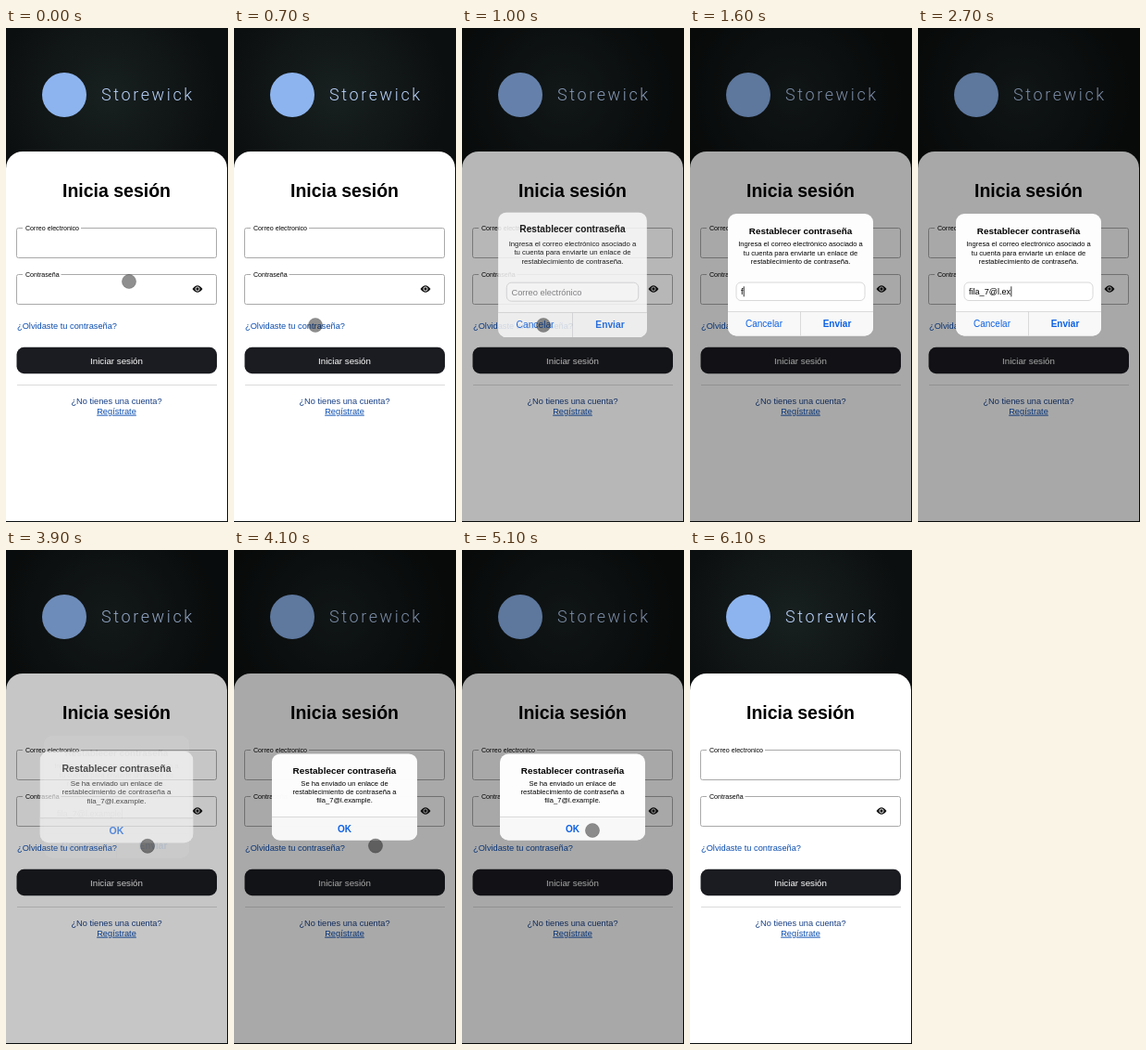
An HTML page that plays this animation: 240x532 px, repeating every 6200 ms.

```html
<!DOCTYPE html>
<html lang="es">
<head>
<meta charset="utf-8">
<title>Inicia sesión</title>
<style>
  html, body { margin: 0; width: 100%; height: 100%; overflow: hidden; background: #0c0f0f; }
  svg { display: block; width: 100%; height: 100%; }
  text { font-family: "Liberation Sans", Arial, sans-serif; fill: #000; white-space: pre; }
  .mid { text-anchor: middle; }
  .bold { font-weight: 700; }
  .brand { font: 300 18px Roboto, "Open Sans", sans-serif; fill: #b9d3fb; }
  .h1 { font-size: 19.5px; }
  .label { font-size: 7.1px; }
  .link { font-size: 9.25px; fill: #0b4db0; }
  .field { fill: #fff; stroke: #a0a0a0; stroke-width: .9; }
  .head { font-size: 9.9px; }
  .body { font-size: 7.6px; }
  .entry { font-size: 9.1px; }
  .action { font-size: 10px; fill: #0c60e4; }
  .rule { stroke: #d2d2d4; stroke-width: .8; }
</style>
</head>
<body>
<svg viewBox="0 0 240 532" preserveAspectRatio="none">
  <defs>
    <radialGradient id="glow" gradientUnits="userSpaceOnUse" cx="110" cy="72" r="120">
      <stop offset="0" stop-color="#182020"/>
      <stop offset="1" stop-color="#0c0f0f"/>
    </radialGradient>
    <clipPath id="askClip"><rect x="41" y="200" width="157" height="131.5" rx="9"/></clipPath>
    <clipPath id="sentClip"><rect x="41" y="219.5" width="157" height="93" rx="9"/></clipPath>
  </defs>

  <rect width="240" height="532" fill="url(#glow)"/>
  <circle cx="63" cy="72" r="24" fill="#8db4ee"/>
  <text class="brand" x="103" y="78" letter-spacing="2.6">Storewick</text>

  <path d="M0 531V151a18 18 0 0 1 18-18H221a18 18 0 0 1 18 18V531z" fill="#fff"/>
  <text class="mid bold h1" x="119.5" y="181.5">Inicia sesión</text>

  <rect class="field" x="11.5" y="215.5" width="216" height="32" rx="2"/>
  <rect x="18" y="214" width="63" height="3" fill="#fff"/>
  <text class="label" x="21" y="218">Correo electronico</text>

  <rect class="field" x="11.5" y="265.5" width="216" height="32" rx="2"/>
  <rect x="18" y="264" width="41.5" height="3" fill="#fff"/>
  <text class="label" x="21" y="268">Contraseña</text>
  <path d="M201.5 281Q207 273.4 212.5 281Q207 288.6 201.5 281z" fill="#111"/>
  <circle cx="207" cy="281" r="2.1" fill="#111" stroke="#fff" stroke-width=".9"/>

  <text class="link" x="12" y="324.3">¿Olvidaste tu contraseña?</text>
  <rect x="11.5" y="343.8" width="216.5" height="28.4" rx="8" fill="#1b1c21"/>
  <text class="mid" x="119.5" y="361.5" font-size="9.75" style="fill:#fff">Iniciar sesión</text>
  <path class="rule" d="M12 384.5H228"/>
  <text class="mid link" x="119.5" y="405" style="fill:#173f86">¿No tienes una cuenta?</text>
  <text class="mid link" x="119.5" y="415.7" text-decoration="underline">Regístrate</text>

  <rect id="dim" width="240" height="532"/>

  <g id="ask">
    <g clip-path="url(#askClip)">
      <rect x="41" y="200" width="157" height="132" fill="#fdfdfd"/>
      <rect x="41" y="305.5" width="157" height="27" fill="#f8f8f8"/>
      <path class="rule" d="M41 305.5H198M119.5 305.5V332"/>
    </g>
    <text class="mid bold head" x="119.5" y="221.5">Restablecer contraseña</text>
    <g class="mid body">
      <text x="119.5" y="235.4">Ingresa el correo electrónico asociado a</text>
      <text x="119.5" y="244.7">tu cuenta para enviarte un enlace de</text>
      <text x="119.5" y="254">restablecimiento de contraseña.</text>
    </g>
    <rect x="50" y="274" width="139" height="19.5" rx="5" fill="#fff" stroke="#cfcfd1" stroke-width=".8"/>
    <text id="entry" class="entry" x="55" y="287"></text>
    <rect id="caret" y="278.3" width="1" height="11" fill="#333"/>
    <text class="mid action" x="80" y="322">Cancelar</text>
    <text class="mid bold action" x="159" y="322">Enviar</text>
  </g>

  <g id="sent">
    <g clip-path="url(#sentClip)">
      <rect x="41" y="219" width="157" height="94" fill="#fdfdfd"/>
      <rect x="41" y="287.5" width="157" height="26" fill="#f8f8f8"/>
      <path class="rule" d="M41 287.5H198"/>
    </g>
    <text class="mid bold head" x="119.5" y="240.7">Restablecer contraseña</text>
    <g class="mid body">
      <text x="119.5" y="254.2">Se ha enviado un enlace de</text>
      <text x="119.5" y="263.4">restablecimiento de contraseña a</text>
      <text id="sentTo" x="119.5" y="272.4"></text>
    </g>
    <text class="mid bold action" x="119.5" y="303.7">OK</text>
  </g>

  <g id="pointer">
    <circle id="dot" r="7.6" fill="#000" fill-opacity=".44" stroke="#000" stroke-opacity=".25" stroke-width=".8"/>
    <path id="arrow" d="M0-1v12.4l2.9-2.7 2.3 5.2 2.1-.9-2.3-5.1h4z" fill="#000" stroke="#fff" stroke-width=".9"/>
  </g>
</svg>
<script>
const LOOP = 6200;
const EMAIL = 'fila_7@l.example';
const PLACEHOLDER = 'Correo electrónico';
const TYPE_START = 1550, TYPE_STEP = 105;

const $ = id => document.getElementById(id);
const [dim, ask, sent, entry, caret, pointer, dot, arrow] =
  ['dim', 'ask', 'sent', 'entry', 'caret', 'pointer', 'dot', 'arrow'].map($);
$('sentTo').textContent = EMAIL + '.';

const clamp = v => Math.min(1, Math.max(0, v));
const progress = (t, from, to) => clamp((t - from) / (to - from));
const easeOut = p => 1 - (1 - p) ** 3;
const easeInOut = p => p * p * (3 - 2 * p);

// time, x, y
const PATH = [
  [0, 133, 273], [150, 133, 273], [600, 88, 320], [3250, 88, 320],
  [3600, 153, 319], [4750, 153, 318], [5100, 141, 302], [5250, 124, 300]
];

function pointerAt(t) {
  const i = PATH.findIndex(k => k[0] > t);
  if (i < 0) return PATH[PATH.length - 1].slice(1);
  const [a, b] = [PATH[i - 1], PATH[i]];
  const p = easeInOut(progress(t, a[0], b[0]));
  return [a[1] + (b[1] - a[1]) * p, a[2] + (b[2] - a[2]) * p];
}

// Pops in slightly enlarged, then fades out in place.
function showAlert(el, t, open, close, cy) {
  const shown = easeOut(progress(t, open, open + 400));
  const alpha = shown * (1 - easeInOut(progress(t, close, close + 220)));
  const scale = 1 + 0.15 * (1 - shown);
  el.setAttribute('opacity', alpha);
  el.setAttribute('transform', `translate(119.5 ${cy}) scale(${scale}) translate(-119.5 ${-cy})`);
  return alpha;
}

function showEntry(t) {
  const count = Math.max(0, Math.min(EMAIL.length, Math.floor((t - TYPE_START) / TYPE_STEP) + 1));
  const text = count ? EMAIL.slice(0, count) : PLACEHOLDER;
  if (entry.textContent !== text) entry.textContent = text;
  entry.style.fill = count ? '#000' : '#77777b';
  caret.setAttribute('x', 55.2 + (count ? entry.getComputedTextLength() : 0));
  caret.setAttribute('opacity', t > 1200 ? 1 : 0);
}

function showPointer(t) {
  const hidden = (t > 1500 && t < 3250) || t > 5700;
  const isArrow = t >= 3250 && t < 3850;
  pointer.setAttribute('visibility', hidden ? 'hidden' : 'visible');
  pointer.setAttribute('transform', `translate(${pointerAt(t)})`);
  dot.setAttribute('opacity', isArrow ? 0 : 1);
  arrow.setAttribute('opacity', isArrow ? 1 : 0);
}

function draw(t) {
  const a = showAlert(ask, t, 820, 3720, 266);
  const b = showAlert(sent, t, 3790, 5300, 266);
  dim.setAttribute('opacity', 0.34 * (1 - (1 - a) * (1 - b)));
  showEntry(t);
  showPointer(t);
}

const start = performance.now();
function tick() {
  draw((performance.now() - start) % LOOP);
  requestAnimationFrame(tick);
}
tick();
</script>
</body>
</html>
```
